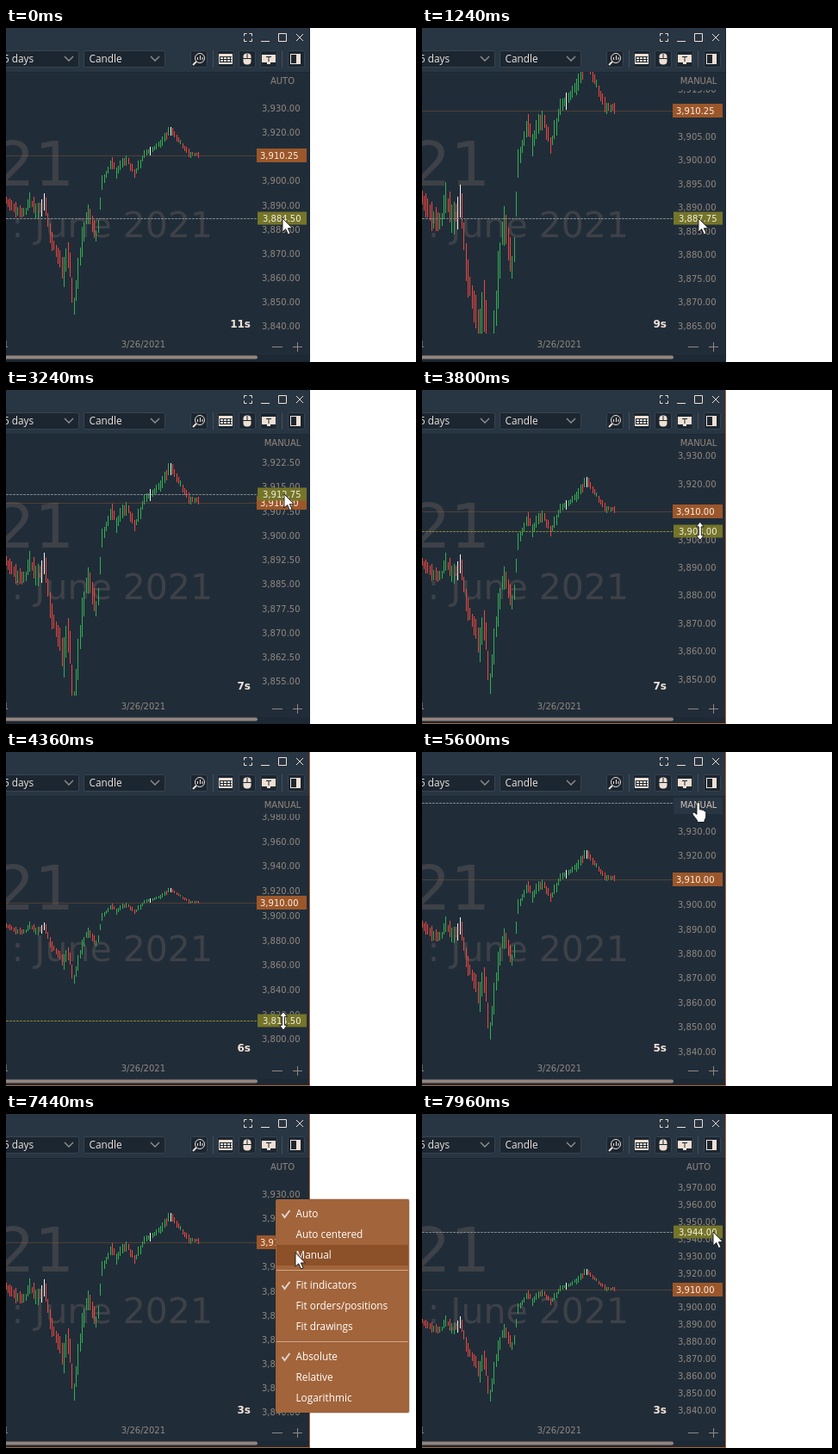
An HTML page that plays this animation: 476x388 px, repeating every 8 s.

```html
<!DOCTYPE html>
<html lang="en">
<head>
<meta charset="utf-8">
<title>Price axis scaling</title>
<style>
  html, body { margin: 0; width: 100%; height: 100%; overflow: hidden; background: #fff; }
  svg { display: block; width: 476px; height: 388px; }
  text { white-space: pre; }
  .num { font: 10px "DejaVu Sans", sans-serif; }
  .axis { fill: #94877e; }
  .ui { font: 11.8px "Open Sans", "Noto Sans", sans-serif; fill: #efe3da; }
  .mark { font-family: "DejaVu Sans", sans-serif; fill: #3e4147; text-anchor: end; }
  .box { fill: #1b2631; stroke: #38444f; }
  .line { fill: none; stroke: #f0dfd3; }
  .cream { fill: #f0dfd3; }
  .dark { fill: none; stroke: #1b2631; }
  #pointer path { fill: #fff; stroke: #111; stroke-width: .9; }
</style>
</head>
<body>
<svg viewBox="0 0 476 388">
  <defs>
    <clipPath id="plotClip"><rect y="51" width="291" height="304"/></clipPath>
    <clipPath id="axisClip"><rect x="291" y="72" width="61" height="283"/></clipPath>
  </defs>
  <rect width="353" height="388" fill="#202d39"/>
  <rect width="353" height="51" fill="#283542"/>
  <rect y="51" width="353" height="1" fill="#1c2833"/>

  <text class="mark" x="79" y="183" font-size="72">2021</text>
  <text class="mark" x="240" y="243" font-size="41">: June 2021</text>

  <g clip-path="url(#plotClip)" fill="none" shape-rendering="crispEdges">
    <path id="up" stroke="#30b04f"/>
    <path id="down" stroke="#ee463c"/>
    <path id="flat" stroke="#f4f4f4"/>
  </g>
  <rect id="lastLine" width="291" height="1" fill="#9b5a2c" opacity=".4"/>
  <path id="cross" stroke-dasharray="3 1" fill="none"/>
  <g id="labels" clip-path="url(#axisClip)"></g>

  <g id="last">
    <rect x="291" y="-8" width="58" height="16" fill="#9b572a"/>
    <text class="num" x="295" y="3.5" fill="#fbeee4"></text>
  </g>
  <g id="tag">
    <rect x="292" y="-7.5" width="57" height="15" fill="#75752a"/>
    <text class="num" x="298" y="3.5" fill="#f3efe0"></text>
  </g>

  <rect id="modeBox" x="292" y="53" width="57" height="19" fill="#283542"/>
  <text id="mode" class="num axis" x="321" y="65" text-anchor="middle"></text>
  <text id="timer" x="284" y="348" text-anchor="end" fill="#f3e3d8" style="font:bold 12px 'DejaVu Sans',sans-serif"></text>
  <text class="num axis" x="185" y="371" text-anchor="end">3/26/2021</text>
  <text class="num axis" x="3" y="371" text-anchor="end">3/25/2021</text>
  <path d="M309 370.5h12M333 370.5h11M338.5 365v11" stroke="#94877e" fill="none"/>
  <rect y="380" width="353" height="8" fill="#1d2934"/>
  <rect x="-5" y="380.5" width="297" height="4" rx="2" fill="#95857f"/>

  <path class="line" d="M276.5 9.5v-3h3M282.5 6.5h3v3M285.5 12.5v3h-3M279.5 15.5h-3v-3M296 15.5h10M316.5 6.5h9v9h-9zM337 7l8 8M345 7l-8 8"/>
  <rect class="box" x="-5.5" y="26.5" width="90" height="19" rx="2"/>
  <rect class="box" x="90.5" y="26.5" width="94" height="19" rx="2"/>
  <text class="ui" x="-3" y="40">5 days</text>
  <text class="ui" x="96.5" y="40">Candle</text>
  <path d="M68 33l5 5 5-5M168 33l5 5 5-5" fill="none" stroke="#97938f" stroke-width="1.3"/>
  <g id="buttons"></g>
  <path d="M240.5 26v20M320.5 26v20" stroke="#43505b"/>
  <g class="line">
    <circle cx="225" cy="35" r="5.5"/><path d="M221 39l-4 4" stroke-width="2"/>
    <path d="M222.5 34v3M225.5 32v5M228 34v3"/>
  </g>
  <rect class="cream" x="247" y="30" width="16" height="12"/>
  <path class="dark" d="M248 33.5h14M248 36.5h14M248 39.5h14"/>
  <path class="dark" d="M248 35h14M248 38h14" stroke-width="2" stroke-dasharray="1 3"/>
  <rect class="cream" x="275.5" y="29.5" width="9" height="13" rx="4"/>
  <path class="dark" d="M275 35.5h10M280 30v5"/>
  <path class="cream" d="M297 31h16v9h-6v2h-4v-2h-6z"/>
  <path class="dark" d="M302 33.5h6M305 34v5"/>
  <rect class="line" x="330.5" y="30.5" width="11" height="11"/>
  <rect class="cream" x="337" y="30" width="5" height="12"/>

  <path id="frame" d="M352.5 0V387.5H0" fill="none"/>

  <g id="menu">
    <rect x="312.5" y="98" width="156.5" height="250" rx="3" opacity=".15"/>
    <rect x="313" y="99" width="155" height="248" rx="2" fill="#a2643a"/>
    <rect id="hover" x="314" width="153" height="24" fill="#7d451d" opacity=".6"/>
    <path d="M314 181.5h153M314 264.5h153" stroke="#ecd6c5" opacity=".6"/>
    <g id="items"></g>
  </g>

  <g id="pointer">
    <path id="arrow" d="M0 0v16l3.7-3.4 2.7 6.2 2.7-1.2-2.7-5.9h5z"/>
    <path id="resize" d="M0-10.5l4.5 5.5h-3v10h3l-4.5 5.5-4.5-5.5h3v-10h-3z"/>
    <path id="hand" d="M-2 1.5q0-2 1.800-2t1.800 2v6.5q1.600-1 2.700.6 1.500-.7 2.400.8 2-.2 2 2v4.600q0 2-1.700 4v2.500h-8.500v-2l-5-6.500q-1.500-2.500.5-3 1.500-.2 4 2.500z"/>
  </g>
</svg>
<script>
const LOOP = 8000, MID = 203, BASE = 2.81, PITCH = 2.33;
const $ = id => document.getElementById(id);
const set = (el, attrs) => { for (const k in attrs) el.setAttribute(k, attrs[k]); };
const show = (el, on) => { el.style.display = on ? '' : 'none'; };
function add(parent, tag, attrs, text) {
  const el = document.createElementNS('http://www.w3.org/2000/svg', tag);
  set(el, attrs);
  if (text) el.textContent = text;
  return parent.appendChild(el);
}
const money = v => v.toFixed(2).replace(/^(\d)(\d{3})/, '$1,$2');
const ramp = (t, a, b) => Math.min(1, Math.max(0, (t - a) / (b - a)));

// each move: start, end, then the values reached
const follow = (from, moves, t) => moves.reduce(
  (now, [a, b, ...to]) => now.map((v, i) => v + (to[i] - v) * ramp(t, a, b)), from);

// pixels per point: two wheel zooms in, one out, then an axis drag down and up
const zooms = [[960, 1240, 5.51], [1360, 1640, 7.2], [1960, 2240, 3.763],
  [3640, 4360, 1.436], [4480, 5280, 2.844]];
const moves = [[2760, 3240, 323, 121.5], [3640, 4360, 322, 312.9], [4480, 5280, 322, 174],
  [5320, 5560, 321, 59.5], [6040, 6280, 310, 95], [7040, 7280, 336, 162], [7440, 7520, 338, 137.5]];

// turning points of the price: x and height at the base scale
const turns = [[0, 200], [12, 212], [23, 214], [28, 201], [36, 211], [46, 204], [54, 250],
  [67, 279], [73, 262], [79, 321], [92, 226], [97, 215], [106, 245], [112, 178], [124, 155],
  [128, 168], [140, 152], [150, 169], [162, 145], [176, 137], [191, 119], [214, 147], [226, 146]];
function trend(x) {
  const i = Math.max(1, turns.findIndex(p => p[0] >= x));
  const [[x0, y0], [x1, y1]] = [turns[i - 1], turns[i]];
  return y0 + (y1 - y0) * (x - x0) / (x1 - x0);
}
const spread = x => 9 - x / 45 + 11 * Math.exp(-(((x - 80) / 25) ** 2));

let seed = 11;
const rnd = () => (seed = seed * 16807 % 2147483647) / 2147483647;
const flats = [18, 19, 72, 82];
const priceAt = y => 3891 - (y - MID) / BASE;
const bars = Array.from({ length: 97 }, (_, i) => {
  const x = i * PITCH, h = spread(x) * (.45 + rnd() * .65);
  const mid = trend(x) + (rnd() - .5) * h * .7;
  const rise = trend(x) - trend(Math.min(225, x + PITCH)) + (rnd() - .5) * 9;
  return {
    x: Math.floor(x) + .5, hi: priceAt(mid - h), lo: priceAt(mid + h),
    kind: flats.includes(i) ? 'flat' : rise > 0 ? 'up' : 'down'
  };
});

for (const x of [214, 245, 270, 295, 327])
  add($('buttons'), 'rect', { class: 'box', x: x + .5, y: 26.5, width: 19, height: 19, rx: 2 });

[['Auto', 'Auto centered', 'Manual'],
 ['Fit indicators', 'Fit orders/positions', 'Fit drawings'],
 ['Absolute', 'Relative', 'Logarithmic']].forEach((group, g) => group.forEach((name, i) => {
  const y = 116 + g * 83 + i * 24;
  add($('items'), 'text', { class: 'ui', x: 336.5, y: y + 4, style: 'fill:#fff;font-weight:500' }, name);
  if (!i) add($('items'), 'path', { d: `M320.5 ${y}l3 4 6-8`, fill: 'none', stroke: '#dcd5cf', 'stroke-width': 2 });
}));

const labels = Array.from({ length: 24 }, () => add($('labels'), 'text', { class: 'num axis', x: 297 }));

function view(t) {
  if (t >= 7760) return { s: 1.988, c: 3910.9, gap: 18 };
  return { s: t < 6040 ? follow([BASE], zooms, t)[0] : BASE, c: 3891, gap: 25 };
}

function drawChart(t, { s, c, gap }) {
  const toY = p => MID - (p - c) * s;
  const d = { up: '', down: '', flat: '' };
  for (const b of bars) d[b.kind] += `M${b.x} ${toY(b.hi).toFixed(1)}V${toY(b.lo).toFixed(1)}`;
  for (const k in d) set($(k), { d: d[k] });

  const step = [2.5, 5, 7.5, 10, 20, 25, 50].find(v => v * s >= gap);
  const first = Math.ceil((c - 160 / s) / step) * step;
  labels.forEach((el, i) => {
    const p = first + i * step;
    el.textContent = money(p);
    set(el, { y: (toY(p) + 3.7).toFixed(1) });
  });

  const price = t < 2760 ? 3910.25 : 3910, y = Math.round(toY(price) - .5);
  set($('last'), { transform: `translate(0 ${y})` });
  $('last').lastElementChild.textContent = money(price);
  set($('lastLine'), { y });
}

function draw(t) {
  const v = view(t);
  drawChart(t, v);

  const [x, y] = follow([321, 221.5], moves, t), row = Math.floor(y);
  const dragging = t >= 3600 && t < 5300, onMode = y < 73;
  const menuOn = t >= 6640 && t < 7920;

  show($('cross'), !menuOn);
  set($('cross'), { d: `M0 ${row + .5}H291`, stroke: dragging ? '#85852c' : '#7f8589' });
  show($('tag'), !menuOn && !onMode);
  set($('tag'), { transform: `translate(0 ${row})` });
  $('tag').lastElementChild.textContent = money(Math.ceil((v.c - (y - MID) / v.s) * 4) / 4);

  show($('modeBox'), onMode);
  $('mode').textContent = t >= 1000 && t < 6040 ? 'MANUAL' : 'AUTO';
  $('mode').style.fill = onMode ? '#d5c5ba' : '';
  $('timer').textContent = (t < 520 ? 11 : 10 - Math.floor(t / 1060)) + 's';
  // the window gains focus when the drag begins
  set($('frame'), { stroke: t < 3560 ? '#1b2630' : '#a9673f' });

  show($('menu'), menuOn);
  set($('menu'), { opacity: t < 6720 ? .3 : t < 6840 ? .61 : 1 - ramp(t, 7760, 7920) });
  const item = Math.floor((y - 104) / 24);
  show($('hover'), x > 313 && item >= 0);
  set($('hover'), { y: 104 + Math.max(0, item) * 24 });

  const hand = t >= 5320 && onMode;
  show($('resize'), dragging);
  show($('hand'), hand);
  show($('arrow'), !dragging && !hand);
  set($('pointer'), { transform: `translate(${x.toFixed(1)} ${(y - .5).toFixed(1)})` });
}

function tick() {
  draw(performance.now() % LOOP);
  requestAnimationFrame(tick);
}
tick();
</script>
</body>
</html>
```
